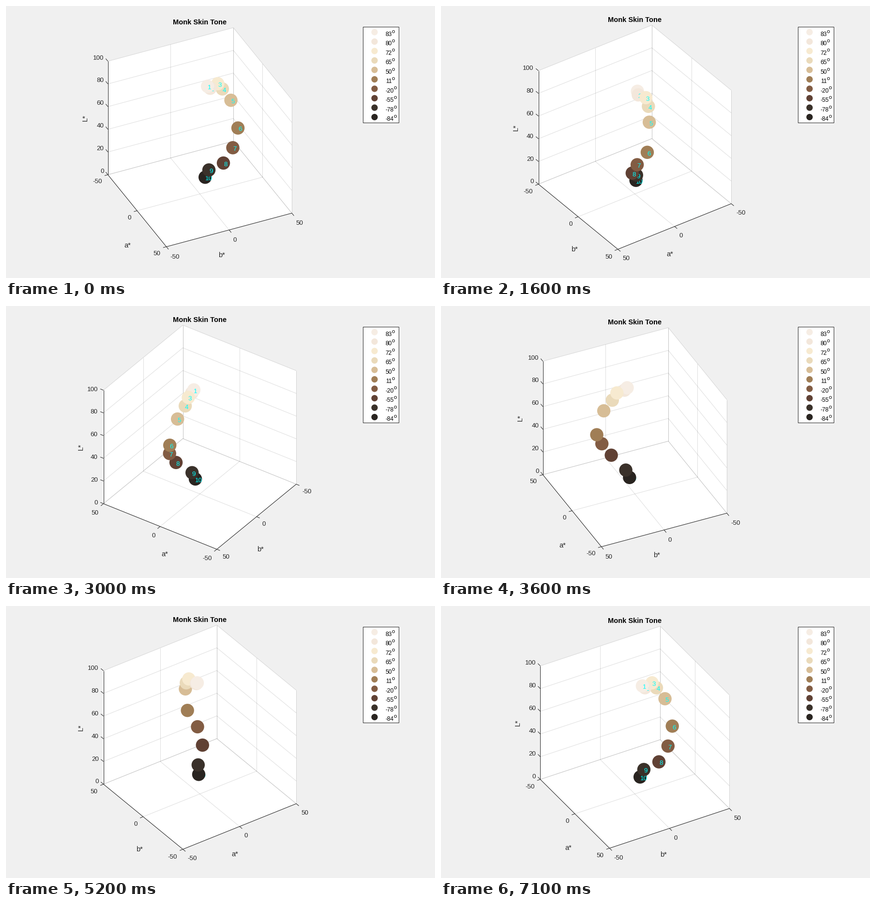
A matplotlib script that plays this animation: 887x562 px, repeating every 7.2 s.

```python
import math
import numpy as np
import matplotlib.pyplot as plt
from matplotlib.animation import FuncAnimation
from matplotlib.patches import Circle, Polygon, Rectangle

W, H, DPI = 887, 562, 64
STEPS = 72
SIDE = 286.2                      # cube edge in pixels
ELEV = math.radians(35)
CX, CY = 400.8, 387.8             # centre of the floor on screen
INK, CYAN = "#262626", "#00ffff"

# colour, L*, a*, b*
TONES = [
    ("#f6ede4", 94.21, 1.50, 5.42),
    ("#f3e7db", 92.28, 2.06, 7.28),
    ("#f7ead0", 93.09, 0.22, 14.21),
    ("#eadaba", 87.57, 0.46, 17.75),
    ("#d7bd96", 77.90, 3.47, 23.14),
    ("#a07e56", 55.14, 7.78, 26.74),
    ("#825c43", 42.47, 12.33, 20.53),
    ("#604134", 30.68, 11.67, 13.34),
    ("#3a312a", 21.07, 2.69, 5.96),
    ("#292420", 14.61, 1.48, 3.53),
]
LABEL_SHIFT = 0.1                 # numbers sit slightly off their points in a* and b*
LEVELS = range(0, 101, 20)
MARKS = (-50, 0, 50)

# Axis name offset from the middle of its edge, by the angle of the edge
NAME_ANGLE = [0, 5, 15, 25, 35, 55, 65, 75, 80]
NAME_DX = [23, 21.5, 18, 15.3, 9.3, -7.8, -19.5, -31.7, -38]
NAME_DY = [33.5, 37.5, 45, 51.3, 56.7, 67, 71.5, 73.4, 74]

plt.rcParams["font.family"] = "Liberation Sans"
fig = plt.figure(figsize=(W / DPI, H / DPI), dpi=DPI, facecolor="#f0f0f0")
ax = fig.add_axes([0, 0, 1, 1])
ax.set_xlim(0, W)
ax.set_ylim(H - 0.5, -0.5)
ax.axis("off")


def pt(px):
    return px * 72 / DPI


def make_line(z, **style):
    line, = ax.plot([], [], lw=pt(1), zorder=z, solid_capstyle="butt", **style)
    return line


def make_text(size, color=INK, z=10, x=0, y=0, s="", **style):
    return ax.text(x, y, s, fontsize=pt(size), color=color, zorder=z,
                   va="baseline", rotation_mode="anchor", **style)


def set_line(line, p, q):
    line.set_data([p[0], q[0]], [p[1], q[1]])


class View:
    """Orthographic camera turned by theta around the L* axis."""

    def __init__(self, theta):
        self.c, self.s = math.cos(theta), math.sin(theta)

    def near(self, a, b):
        return a * self.c - b * self.s

    def side(self, a, b):
        return b * self.c + a * self.s

    def depth(self, a, b, z):
        return self.near(a, b) * math.cos(ELEV) + z * math.sin(ELEV)

    def point(self, a, b, z=0):
        k = SIDE / 100
        return np.array([CX + k * self.side(a, b),
                         CY + k * (self.near(a, b) * math.sin(ELEV)
                                   - z * math.cos(ELEV))])


def unit(v):
    return v / np.hypot(*v)


box = ax.add_patch(Polygon([(0, 0)] * 6, fc="white", ec="none", zorder=1))
grid = [make_line(2, color=INK, alpha=0.15) for _ in range(24)]
edges = [make_line(3, color=INK) for _ in range(3)]
ticks = [make_line(3, color=INK) for _ in range(12)]
tick_texts = [make_text(13.33) for _ in range(12)]
names = [make_text(14.67, ha="center") for _ in range(3)]
title = make_text(14.67, "black", x=401, s="Monk Skin Tone", ha="center", weight="bold")
dots, numbers = [], []
for n, tone in enumerate(TONES, 1):
    dots.append(ax.add_patch(Circle((0, 0), 13.7, fc=tone[0], ec="none")))
    numbers.append(make_text(13.33, CYAN, s=str(n), ha="left"))


def draw_legend():
    ax.add_patch(Rectangle((738, 42.3), 74, 198, fc="white", ec=INK, lw=pt(1), zorder=300))
    for n, (color, L, a, b) in enumerate(TONES):
        y = 53.5 + 19.5 * n
        angle = str(round(math.degrees(math.atan((L - 50) / b))))
        ax.add_patch(Circle((762, y), 6.6, fc=color, ec="none", zorder=301))
        make_text(12, "black", 301, 784.8, y + 7.7, angle, ha="left")
        width = 6.67 * len(angle.strip("-")) + 4 * angle.startswith("-")
        make_text(11.2, "black", 301, 784.6 + width, y + 1.5, "o", ha="left")


def grid_segments(back):
    a0, b0 = back
    for m in MARKS:
        yield (m, -50, 0), (m, 50, 0)
        yield (-50, m, 0), (50, m, 0)
        yield (m, b0, 0), (m, b0, 100)
        yield (a0, m, 0), (a0, m, 100)
    for z in LEVELS:
        yield (a0, -50, z), (a0, 50, z)
        yield (-50, b0, z), (50, b0, z)


def put_tick(i, p, way, value, ha, top):
    set_line(ticks[i], p, p + 7 * way)
    x, y = p + 12.7 * way
    tick_texts[i].set_position((x, y + (14.3 if top else 6.3)))
    tick_texts[i].set_ha(ha)
    tick_texts[i].set_text(str(value))


def put_name(i, s, x, y, upright):
    names[i].set_text(s)
    names[i].set_rotation(90 if upright else 0)
    names[i].set_position((x + 5, y) if upright else (x, y + 5))


def put_floor_axis(view, slot, start, end, way, sign):
    """Ticks and name of one front edge; sign is -1 on the left, 1 on the right."""
    along = 0 if start[0] != end[0] else 1
    level = abs(way[1]) < 0.1
    ha = "center" if abs(way[0]) < 0.48 else ("right" if sign < 0 else "left")
    for k, m in enumerate(MARKS):
        spot = list(start)
        spot[along] = m
        put_tick(6 + 3 * slot + k, view.point(*spot), way, m, ha, not level)
    p, q = view.point(*start), view.point(*end)
    mid = (p + q) / 2
    if level:
        dx, dy = 58 * sign, 0
    else:
        angle = math.degrees(math.acos(min(1, abs(q[0] - p[0]) / SIDE)))
        dx = -sign * np.interp(angle, NAME_ANGLE, NAME_DX)
        dy = np.interp(angle, NAME_ANGLE, NAME_DY)
    put_name(slot, "a*" if along == 0 else "b*", mid[0] + dx, mid[1] + dy, level)


def update(step):
    view = View(math.radians(25 - 5 * step))
    corners = [(a, b) for a in (-50, 50) for b in (-50, 50)]
    left = min(corners, key=lambda c: view.side(*c) - 1e-6 * view.near(*c))
    front = max(corners, key=lambda c: view.near(*c) + 1e-6 * view.side(*c))
    right, back = (-left[0], -left[1]), (-front[0], -front[1])
    pl, pf, pr = (view.point(*c) for c in (left, front, right))
    tl, tb, tr = (view.point(*c, 100) for c in (left, back, right))

    box.set_xy([tl, tb, tr, pr, pf, pl])
    for line, (p, q) in zip(grid, grid_segments(back)):
        set_line(line, view.point(*p), view.point(*q))
    for line, (p, q) in zip(edges, ((tl, pl), (pl, pf), (pf, pr))):
        set_line(line, p, q)

    for k, z in enumerate(LEVELS):
        put_tick(k, view.point(*left, z), unit(pl - pf), z, "right", False)
    put_floor_axis(view, 0, left, front, unit(pf - pr), -1)
    put_floor_axis(view, 1, front, right, unit(pf - pl), 1)
    put_name(2, "L*", pl[0] - 48, (pl[1] + tl[1]) / 2, True)
    title.set_y(tb[1] - 7)

    for dot, number, (_, L, a, b) in zip(dots, numbers, TONES):
        dot.center = view.point(a, b, L)
        dot.set_zorder(100 + view.depth(a, b, L))
        a, b = a + LABEL_SHIFT, b + LABEL_SHIFT
        x, y = view.point(a, b, L)
        number.set_position((x, y + 6.3))
        number.set_zorder(100 + view.depth(a, b, L))
    return []


draw_legend()
update(0)
anim = FuncAnimation(fig, update, frames=STEPS, interval=100, repeat=True,
                     repeat_delay=0, blit=False)
plt.show()
```
